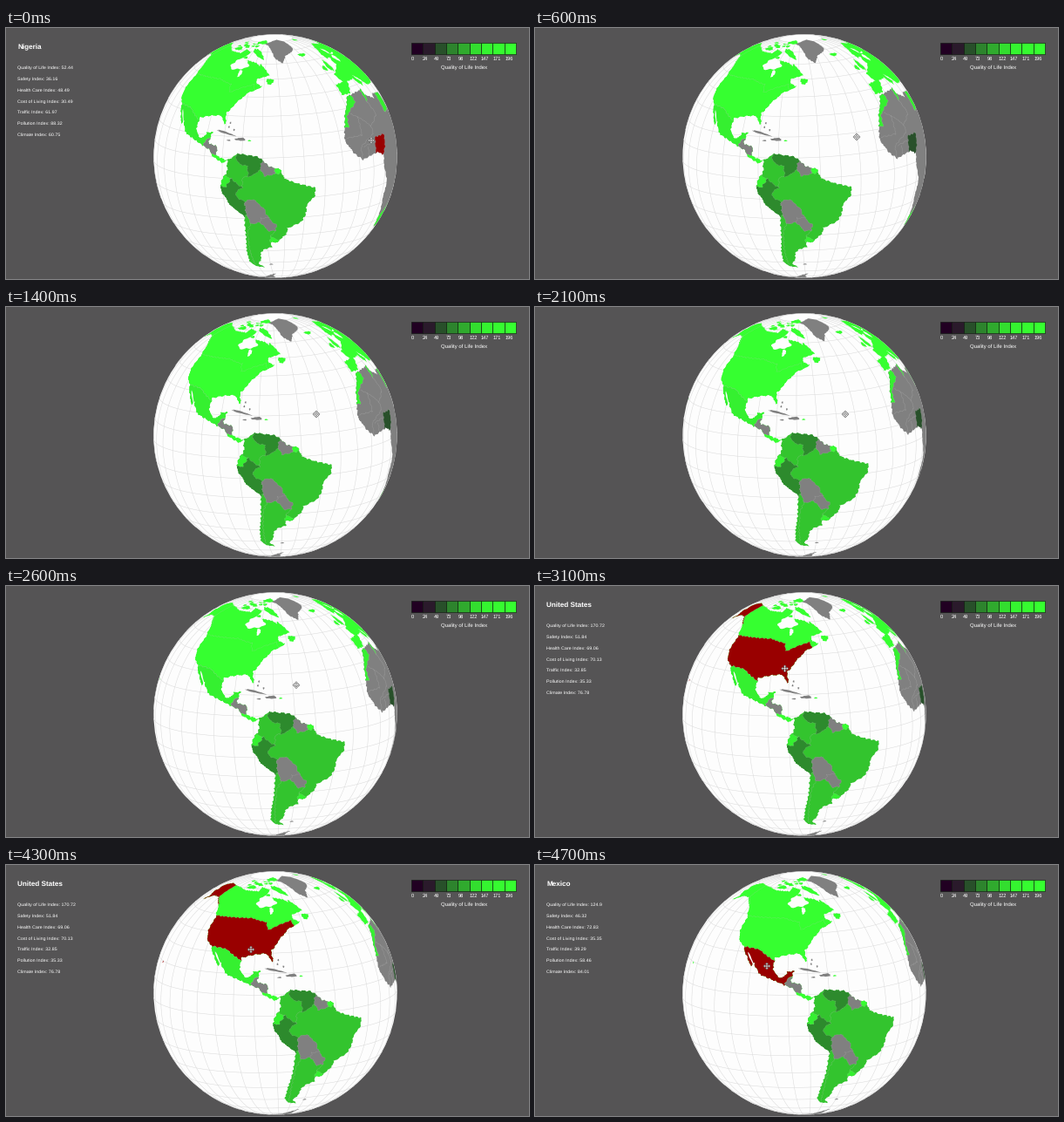
A matplotlib script that plays this animation: 600 px wide and 288 px high, repeating every 4800 ms.

```python
import numpy as np
import matplotlib.pyplot as plt
from matplotlib.animation import FuncAnimation
from matplotlib.patches import Circle, Polygon, Rectangle

W, H, DPI = 600, 288, 100
CX, CY, R = 309, 147, 139.6
TILT, ROLL = np.radians(10.8), np.radians(1.8)
FRAMES, STEP = 48, 100

SCALE = ["#210022", "#2a1a2b", "#28502a", "#2d842d", "#30aa2e",
         "#33de2f", "#35f430", "#36fb30", "#36ff30"]
DIM, MOSS, LEAF, LIME, BRIGHT = SCALE[2], "#2d8a2d", "#33c42e", "#35f030", SCALE[8]
GRAY, RED, OCEAN, BACK = "#808080", "#990000", "#fdfdfd", "#555455"

plt.rcParams.update({"font.family": "Liberation Sans", "text.hinting": "none"})
fig = plt.figure(figsize=(W / DPI, H / DPI), dpi=DPI, facecolor=BACK)
ax = fig.add_axes([0, 0, 1, 1])
ax.set_xlim(0, W)
ax.set_ylim(H, 0)
ax.axis("off")


def px(n):
    return n * 72 / DPI


def label(x, y, s, size, **kw):
    return ax.text(x, y, s, fontsize=px(size), color="white",
                   va="center_baseline", **kw)


def rough(pts):
    """Subdivide a line and give it a coast-like wobble that depends on place only."""
    p = np.array(pts, float).reshape(-1, 2)
    out = []
    for a, b in zip(p[:-1], p[1:]):
        n = int(2 * np.abs(b - a).max()) + 1
        out.append(a + (b - a) * np.linspace(0, 1, n, endpoint=False)[:, None])
    lon, lat = np.vstack(out + [p[-1:]]).T
    return (lon + .3 * np.sin(2.1 * lat + lon) + .2 * np.sin(5 * lat - 3 * lon),
            lat + .25 * np.sin(1.9 * lon - lat) + .15 * np.sin(5 * lon + 3 * lat))


def project(lon, lat, lon0):
    lam, phi = np.radians(lon - lon0), np.radians(lat)
    x = np.cos(phi) * np.sin(lam)
    out = np.cos(phi) * np.cos(lam)
    y = np.cos(TILT) * np.sin(phi) - np.sin(TILT) * out
    z = np.sin(TILT) * np.sin(phi) + np.cos(TILT) * out
    return (x * np.cos(ROLL) - y * np.sin(ROLL),
            x * np.sin(ROLL) + y * np.cos(ROLL), z)


def to_stage(x, y):
    return np.column_stack([CX + R * x, CY - R * y])


shapes, lines = [], []


def shape(color, coords, name=None, within=None):
    edge = (.75, .75, .75, .3) if within else "none"
    patch = Polygon([[0, 0]], fc=color, ec=edge, lw=px(.5), zorder=3)
    ax.add_patch(patch)
    if within:
        patch.set_clip_path(within)
    shapes.append((patch, coords, color, name))
    return patch


def land(color, *pts, **kw):
    return shape(color, rough(pts + pts[:2]), **kw)


def blob(color, lon, lat, w, h, slope=0, name=None):
    """An uneven oval for islands and inland seas."""
    a = np.linspace(0, 2 * np.pi, 40)
    r = 1 + .14 * np.sin(3 * a + lon) + .1 * np.sin(7 * a + lat)
    u = w * r * np.cos(a)
    shape(color, (lon + u, lat + h * r * np.sin(a) + slope * u), name)


def line(coords, **kw):
    lines.append((ax.plot([], [], **kw)[0], coords))


def border(*pts):
    line(rough(pts), color="#c0c0c0", alpha=.35, lw=px(.5), zorder=4)


# North America: one coast, with countries cut out of it
north = land(
    BRIGHT, -130, 55, -141, 60, -151, 60, -163, 54.8, -158, 58.7, -165, 62,
    -162, 64, -167, 65.6, -165, 68.5, -156, 71.2, -128, 70, -115, 68, -96, 67.7,
    -94, 71.5, -82, 69, -87, 64, -86, 62, -78, 62.4, -70, 61, -66, 58.8,
    -64.5, 60.3, -56, 52.5, -66, 50.2, -65, 47.5, -61, 45.8, -66, 43.6,
    -70, 42.5, -76, 37, -81.3, 31, -80.2, 25.3, -84, 30, -90, 29.5, -97.3, 27.7,
    -97.8, 22.5, -95, 18.3, -91.5, 18.6, -90, 21.2, -87, 21.4, -88.5, 16,
    -83.3, 15, -83.5, 10.5, -80, 9.3, -77.3, 8.6, -80, 7.4, -85.5, 10.3,
    -87.5, 13, -95, 16, -105, 19.8, -108.5, 25, -110, 23.2, -117.2, 32.5,
    -121, 35, -124.2, 40, -124, 48)
land(BRIGHT, -126, 49, -95, 49, -84, 46.5, -83, 42, -75, 45, -67, 47, -66, 44,
     -78, 24, -97, 25.9, -103, 29.2, -106.5, 31.6, -114.8, 32.5, -127, 32.5,
     name="United States", within=north)
land(BRIGHT, -141, 73, -172, 73, -172, 52, -141, 58, -131, 53, -131, 56,
     -141, 60.5, name="United States", within=north)
land(LIME, -119, 32.5, -114.8, 32.5, -106.5, 31.6, -103, 29.2, -97, 25.9,
     -86, 24, -86, 20, -90.5, 17, -92.2, 13, -119, 13, name="Mexico", within=north)
land(GRAY, -92.2, 13, -90.5, 17, -87, 19, -82, 16, -83, 11, -90, 11, within=north)

blob(OCEAN, -85.5, 59.5, 8.5, 4)
blob(OCEAN, -80.7, 53.5, 1.5, 2.2)
blob(OCEAN, -111, 27, 2.6, .6, -1.2)

# Islands of the Americas
blob(BRIGHT, -72, 68.5, 9, 2.4, -.4)
blob(BRIGHT, -78, 80, 13, 2.4)
blob(BRIGHT, -110, 71, 7, 1.6)
blob(BRIGHT, -84, 64.5, 2.3, .9)
blob(BRIGHT, -56, 48.7, 2.6, 1.7)
rng = np.random.default_rng(4)
for lon in np.linspace(-122, -82, 11):
    blob(BRIGHT, lon, rng.uniform(72.5, 77.5), rng.uniform(2, 5), rng.uniform(.5, 1.1))
blob(BRIGHT, -155.7, 19.6, .6, .5, name="United States")
land(GRAY, -44, 60, -51, 64, -54, 70, -60, 76, -70, 78, -50, 82, -33, 83.5,
     -20, 80, -21, 72, -26, 69, -39, 65.5)
blob(GRAY, -79.5, 21.6, 5, .5, -.22)
blob(GRAY, -71.2, 18.8, 2.7, .7)
blob(GRAY, -77.3, 18.1, 1, .3)
blob(BRIGHT, -66.5, 18.2, .8, .3)
for lon, lat in [(-78, 24.5), (-77.5, 26.5), (-75, 23.2)]:
    blob(GRAY, lon, lat, .4, .5)

# South America
south = land(
    LEAF, -77.5, 8.5, -72, 12, -62, 10.6, -57, 6, -51.5, 4.3, -50, 0, -44, -2.7,
    -35.2, -5.3, -35, -9, -39, -13.5, -39.5, -19, -41.5, -22.7, -48.5, -25.7,
    -49, -28.7, -54, -34.4, -58.3, -34, -57.2, -37.5, -62.2, -39, -65, -42,
    -66, -47.5, -69, -51, -65.5, -55, -71.5, -54, -75.3, -50, -73.5, -40,
    -71.5, -31, -70.3, -18.4, -76.2, -14, -81.2, -5.5, -80.3, -.5, -77.3, 3.5)
land(MOSS, -72.5, 13, -73, 9, -71, 7, -67.5, 6.2, -67, 1.2, -63.5, 2.5,
     -60.7, 5.2, -59, 13, within=south)
land(GRAY, -60, 9, -61.2, 5.5, -59.5, 1.5, -54.5, 2.2, -54, 7, within=south)
land(BRIGHT, -54, 7, -54.3, 2.3, -52.5, 2.3, -50, 5, within=south)
land(MOSS, -82, -3.5, -75.3, 0, -70, -4.2, -73.5, -6.5, -73, -9.4, -69.5, -11,
     -69, -17.5, -71, -20, -83, -18, within=south)
land(LIME, -82, 1.5, -78.5, 1.3, -75.3, 0, -78.5, -4, -82, -4, within=south)
land(GRAY, -69.5, -11, -65.3, -9.8, -60.5, -14, -58.2, -20, -62.5, -22,
     -67.5, -23, -69.2, -17.5, within=south)
land(GRAY, -58.2, -19.5, -62, -19.7, -62.5, -22.3, -58.5, -27.2, -55, -27,
     -54.3, -24, within=south)
land(LIME, -57.6, -30.2, -53, -33.5, -54, -37, -58.5, -34, within=south)
border(-67, 1.2, -69.8, 1, -70, -4.2)
border(-67.5, -23, -70, -28, -71.5, -40, -72, -52)
border(-55, -27, -57.6, -30.2)
blob(GRAY, -59.5, -51.8, 1.4, .5)
land(GRAY, -57, -63.5, -66, -67, -75, -72, -100, -74, -150, -80, -30, -85,
     -30, -78, -60, -75, -61, -68)

# Europe
land(BRIGHT, -9, 37, -9, 43, -1.5, 43.5, -4.5, 48.3, 1.6, 50.8, 8.5, 54, 8, 57,
     10.5, 57.5, 11, 59, 6, 58.3, 5.5, 62, 14, 68, 26, 71, 41, 67, 60, 69,
     104, 77, 104, 60, 60, 40, 36, 36.5, 23, 37.5, 19, 41.5, 13, 45.5, 18, 40,
     15.6, 38.2, 10.5, 43.5, 3, 43, -2, 36.8)
for lon, lat, w, h in [(18.5, 57, 3, 2.5), (20, 63, 2, 2.5), (25, 60, 4, .5)]:
    blob(OCEAN, lon, lat, w, h)
blob(BRIGHT, -18.5, 65, 4.6, 1.2)
blob(BRIGHT, -2.3, 54.3, 2.2, 3.8)
blob(BRIGHT, -8, 53.3, 1.9, 1.7)
blob(BRIGHT, 17, 78.5, 5, 1.3)

# Africa
africa = land(
    GRAY, -5.9, 35.8, 10.5, 37.2, 10.5, 34, 19, 30.5, 21, 32.8, 34, 31, 43, 11.5,
    51, 11.8, 40, -4, 40, -15, 28, -33, 19, -34.7, 12, -17, 13.5, -10, 9, -1,
    9.5, 4, 4.5, 6.3, -4, 5.2, -8, 4.5, -13.3, 9, -17.3, 14.7, -16.3, 19.5,
    -13, 27.7, -9.7, 30.5)
land(LIME, -6, 37, -2, 36, -1.5, 32, -8.7, 28.5, -12, 26, -13, 21, -19, 21,
     -14, 34, within=africa)
land(LIME, 8.5, 38, 12, 38, 11.5, 33, 9, 30.5, within=africa)
land(LIME, 25, 33, 36, 33, 36, 22, 25, 22, within=africa)
land(LIME, 15, -28.6, 31, -22.5, 34, -30, 28, -36, 15, -36, within=africa)
land(DIM, 2.7, 5.5, 2.8, 9, 4, 13.4, 13.5, 13.5, 12, 7.5, 8.6, 3.5,
     name="Nigeria", within=africa)
border(-8.7, 27, -4.8, 25, 3.2, 19, 12, 23.5, 9, 30.5)
border(-4.8, 25, -5.5, 16, -16, 16)
border(3.2, 19, 3.5, 15.3, -4, 12.5, -8, 10.3, -7.6, 4.5)
border(-5.5, 10.5, 2.5, 11.5)
border(-2.8, 10, -3, 5.2)

# Globe and graticule
ax.add_patch(Circle((CX, CY), R, fc=OCEAN, ec="none", zorder=1))
grid_style = dict(color="#dadada", lw=px(.5), zorder=2)
span, ring = np.arange(-80, 81, 2), np.arange(-180, 181, 2)
for lon in range(-180, 180, 10):
    line((np.full(span.size, lon), span), **grid_style)
for lat in range(-80, 81, 10):
    line((ring, np.full(ring.size, lat)), **grid_style)

# Legend
for i, color in enumerate(SCALE):
    ax.add_patch(Rectangle((465 + 13.35 * i, 17), 13.35, 13, fc=color,
                           ec="#101810", lw=px(.6)))
    label(466.8 + 13.8 * i, 35, str(int(24.5 * i)), 5.6, ha="center")
label(525.5, 44.8, "Quality of Life Index", 6, ha="center")

# Details panel
FIELDS = ["Quality of Life", "Safety", "Health Care", "Cost of Living",
          "Traffic", "Pollution", "Climate"]
STATS = {
    "Nigeria": [52.44, 36.16, 48.49, 30.49, 61.97, 88.32, 60.75],
    "United States": [170.72, 51.84, 69.06, 70.13, 32.85, 35.33, 76.78],
    "Mexico": [124.9, 46.32, 72.83, 35.35, 39.29, 58.46, 84.01],
}
title = label(13, 21.5, "", 8.1, weight="bold")
rows = [label(13, 45.3 + 12.8 * i, "", 5.4) for i in range(len(FIELDS))]

# Four-headed pointer
arm = np.array([[-.6, -.6], [-.6, -2.2], [-1.7, -2.2], [0, -4],
                [1.7, -2.2], [.6, -2.2]])
turns = [np.array([[c, s], [-s, c]]) for c, s in [(1, 0), (0, 1), (-1, 0), (0, -1)]]
POINTER = np.vstack([arm @ t for t in turns])
pointer = Polygon(POINTER, fc="white", ec="#505050", lw=px(.5), zorder=6)
ax.add_patch(pointer)
# time, x, y
STOPS = np.array([(0, 419, 129), (600, 369, 125), (1000, 356, 123),
                  (2400, 356, 123), (3000, 287, 95), (3800, 284, 93),
                  (4300, 281, 97), (4700, 266, 116)]).T


def hovered(t):
    if t < 100:
        return "Nigeria"
    if t < 2900:
        return None
    return "United States" if t < 4500 else "Mexico"


def update(n):
    t = n * STEP
    lon0 = -53.8 - .006 * t
    active = hovered(t)

    for patch, coords, color, name in shapes:
        x, y, z = project(*coords, lon0)
        # hidden points slide out to the limb
        r = np.where(z < 0, np.hypot(x, y), 1)
        patch.set_xy(to_stage(x / r, y / r))
        patch.set_visible(bool((z > 0).any()))
        patch.set_facecolor(RED if name and name == active else color)
    for curve, coords in lines:
        x, y, z = project(*coords, lon0)
        x[z < 0] = np.nan
        curve.set_data(*to_stage(x, y).T)

    title.set_text(active or "")
    for i, row in enumerate(rows):
        row.set_text(f"{FIELDS[i]} Index: {STATS[active][i]}" if active else "")
    pointer.set_xy(POINTER + [np.interp(t, STOPS[0], s) for s in STOPS[1:]])


anim = FuncAnimation(fig, update, frames=FRAMES, interval=STEP, repeat=True,
                     repeat_delay=0, init_func=lambda: None)
plt.show()
```
